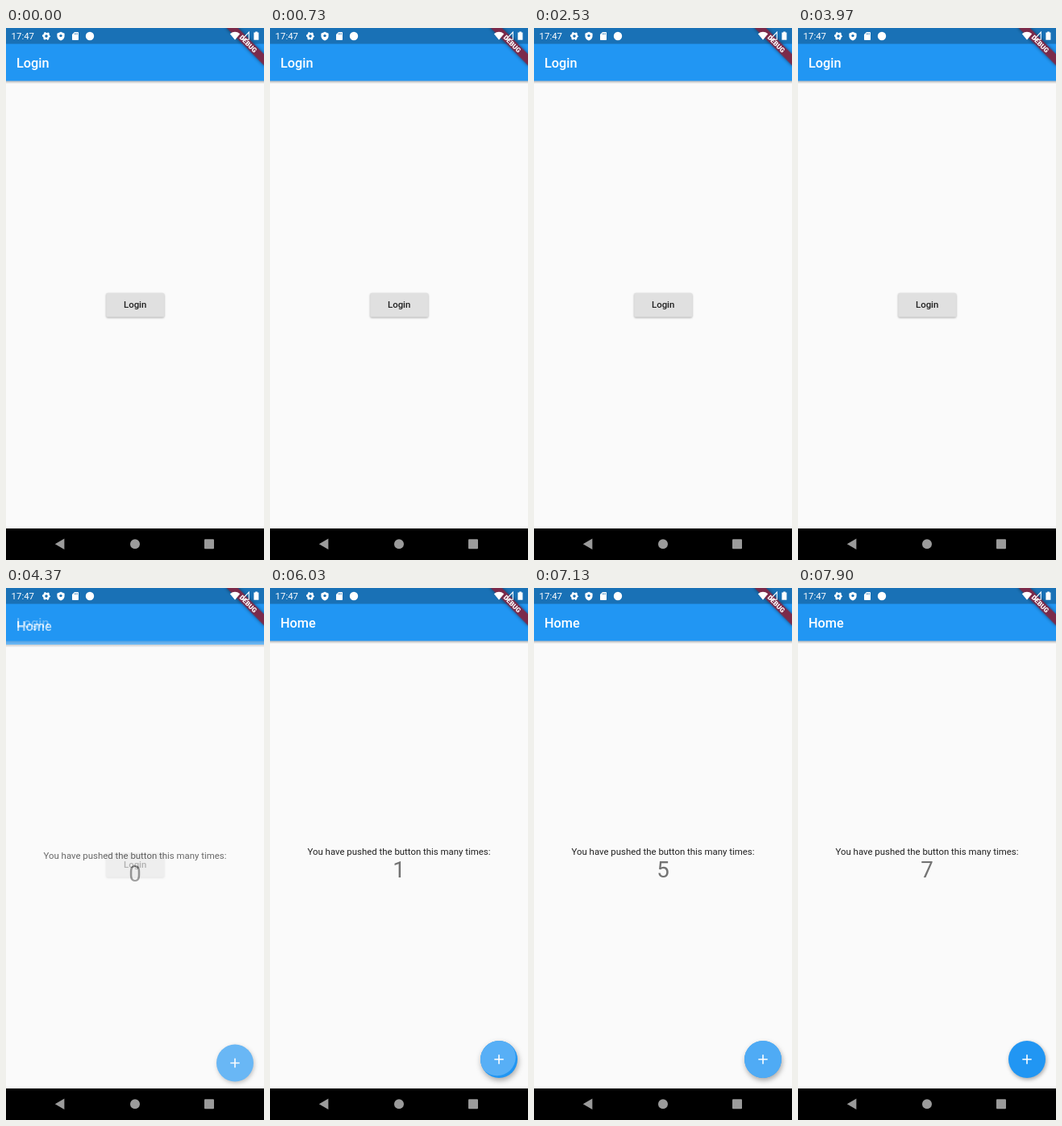
These frames come from a looping animation (320x658 px, 8000 ms). An HTML page:

```html
<!DOCTYPE html>
<html lang="en">
<head>
<meta charset="utf-8">
<title>Login and counter</title>
<style>
  html, body { margin: 0; width: 100%; height: 100%; overflow: hidden; background: #000; }
  svg { display: block; width: 100vw; height: 100vh; font-family: Roboto, Arial, sans-serif; }
  .page { fill: #fafafa; }
  .bar { fill: #2196f3; }
  .title { fill: #fff; font-size: 16.3px; font-weight: 500; }
  .body { fill: #212121; font-size: 11.42px; text-anchor: middle; }
  .count { fill: #737373; font-size: 27.7px; text-anchor: middle; }
  .button { fill: #e0e0e0; filter: drop-shadow(0 1px 1px rgba(0, 0, 0, .3)); }
  .fab { fill: #2196f3; }
  .nav { fill: #9b9b9b; }
  .icon { fill: #fff; }
</style>
</head>
<body>
<svg viewBox="0 0 320 658" preserveAspectRatio="none">
  <defs>
    <linearGradient id="under" x2="0" y2="1">
      <stop offset="0" stop-opacity=".26"/>
      <stop offset="1" stop-opacity="0"/>
    </linearGradient>
    <clipPath id="fabClip"><circle cx="284" cy="583" r="23"/></clipPath>
    <clipPath id="buttonClip"><rect x="124.3" y="327.8" width="72" height="29.6" rx="1.6"/></clipPath>
  </defs>

  <g id="login">
    <rect class="page" width="320" height="619"/>
    <rect class="bar" width="320" height="65.5"/>
    <rect y="65.5" width="320" height="3.5" fill="url(#under)"/>
    <text class="title" x="13" y="48.5">Login</text>
    <rect class="button" x="124.3" y="327.8" width="72" height="29.6" rx="1.6"/>
    <circle id="loginInk" clip-path="url(#buttonClip)" cx="160" cy="342" fill="#c8c8c8"/>
    <text class="body" x="160.2" y="346.2" font-weight="500">Login</text>
  </g>

  <g id="home">
    <rect class="page" width="320" height="619"/>
    <rect class="bar" width="320" height="65.5"/>
    <rect y="65.5" width="320" height="3.5" fill="url(#under)"/>
    <text class="title" x="13" y="48.5">Home</text>
    <text class="body" x="160" y="330">You have pushed the button this many times:</text>
    <text id="count" class="count" x="160" y="358.4">0</text>
    <circle id="fab" class="fab" cx="284" cy="583" r="23"/>
    <g id="inks" clip-path="url(#fabClip)" fill="#57aff6"></g>
    <path d="M278.3 583h11.4M284 577.3v11.4" stroke="#fff" stroke-width="1.6"/>
  </g>

  <rect width="320" height="19.6" fill="#1971b6"/>

  <g class="icon">
    <text x="6.6" y="14" font-size="11.4">17:47</text>
    <g transform="translate(50 10)">
      <circle r="2.9" fill="none" stroke="#fff" stroke-width="2.4"/>
      <circle r="4.2" fill="none" stroke="#fff" stroke-width="1.7" stroke-dasharray="2.2 2.198" stroke-dashoffset="1.1"/>
    </g>
    <path d="M68 4.8l4.6 1.9v3.2c0 2.6-1.9 4.7-4.6 5.5-2.7-.8-4.6-2.9-4.6-5.5V6.7z"/>
    <circle cx="68" cy="9.6" r="1.7" fill="#1971b6"/>
    <path d="M85 5h4.2q.8 0 .8.8v8.4q0 .8-.8.8h-6.4q-.8 0-.8-.8V8z"/>
    <path d="M85.2 6.3v2M86.8 6.3v2M88.4 6.3v2" stroke="#1971b6" stroke-width=".7"/>
    <circle cx="104" cy="10" r="5.2"/>
  </g>

  <g transform="translate(320 0) rotate(45)">
    <rect x="-34" y="22.8" width="68" height="9.8" fill="#7b2a4a"
      style="filter: drop-shadow(0 0 2px rgba(0, 0, 0, .5))"/>
    <text y="30.7" fill="#fff" font-size="8.3" font-weight="900" text-anchor="middle">DEBUG</text>
  </g>

  <g class="icon">
    <path d="M277.8 7.2q6.2-4.8 12.4 0L284 14.8z"/>
    <path d="M301.3 5.2v9.1h-8.6z" fill="none" stroke="#fff" stroke-width="1.1"/>
    <path d="M309.2 4.5h2.6v1h1.6v9.3h-6V5.5h1.8z"/>
  </g>

  <rect y="619" width="320" height="39" fill="#000"/>
  <g class="nav">
    <path d="M60.8 638.3l11.6-6.8v13.6z"/>
    <circle cx="160" cy="638.3" r="6"/>
    <rect x="246" y="632.3" width="12" height="12" rx="1"/>
  </g>
</svg>
<script>
const LOOP = 8000, OPEN = 4136, OPEN_TIME = 300, RISE = 155;
const PRESSES = [5850, 6200, 6430, 6660, 6900, 7200, 7450];
const HOLD = 80;

const $ = id => document.getElementById(id);
const clamp = v => Math.min(1, Math.max(0, v));
const set = (el, attrs) => {
  for (const name in attrs) el.setAttribute(name, attrs[name]);
};

function bezier(x1, y1, x2, y2) {
  const at = (a, b, s) => 3 * a * s * (1 - s) ** 2 + 3 * b * s * s * (1 - s) + s ** 3;
  return x => {
    let lo = 0, hi = 1;
    for (let i = 0; i < 24; i++) {
      const mid = (lo + hi) / 2;
      if (at(x1, x2, mid) < x) lo = mid; else hi = mid;
    }
    return at(y1, y2, hi);
  };
}
const slide = bezier(.4, 0, .2, 1);
const fade = bezier(.42, 0, 1, 1);

const inks = PRESSES.map(() => {
  const ink = document.createElementNS("http://www.w3.org/2000/svg", "circle");
  $("inks").append(ink);
  return ink;
});

// Ripple strength: full while it spreads, then gone.
const inkAlpha = age => age < 0 ? 0 : 1 - clamp((age - 200) / 220);

function drawHome(t) {
  const p = clamp((t - OPEN) / OPEN_TIME);
  const home = $("home");
  home.style.display = p > 0 ? "" : "none";
  set(home, {
    transform: `translate(0 ${RISE * (1 - slide(p))})`,
    opacity: p < 1 ? fade(p) : 1
  });
  $("count").textContent = PRESSES.filter(at => t >= at + HOLD).length;
}

function drawInks(t) {
  let lift = 0;
  inks.forEach((ink, i) => {
    const age = t - PRESSES[i];
    const k = clamp(age / 300);
    const alpha = inkAlpha(age);
    lift = Math.max(lift, alpha * clamp(age / 100));
    set(ink, {
      cx: 284 - 6 * (1 - k),
      cy: 583 - 7 * (1 - k),
      r: 8 + 25 * k,
      opacity: alpha
    });
  });
  $("fab").style.filter =
    `drop-shadow(1px ${2.5 + lift}px ${2.5 + lift}px rgba(0, 0, 0, .34))`;

  const age = t - OPEN;
  set($("loginInk"), {
    r: 6 + 38 * clamp(age / 220),
    opacity: age < 0 ? 0 : .6 * inkAlpha(age + 60)
  });
}

function draw(now) {
  const t = now % LOOP;
  drawHome(t);
  drawInks(t);
}

const start = performance.now();
function tick() {
  draw(performance.now() - start);
  requestAnimationFrame(tick);
}
tick();
</script>
</body>
</html>
```
